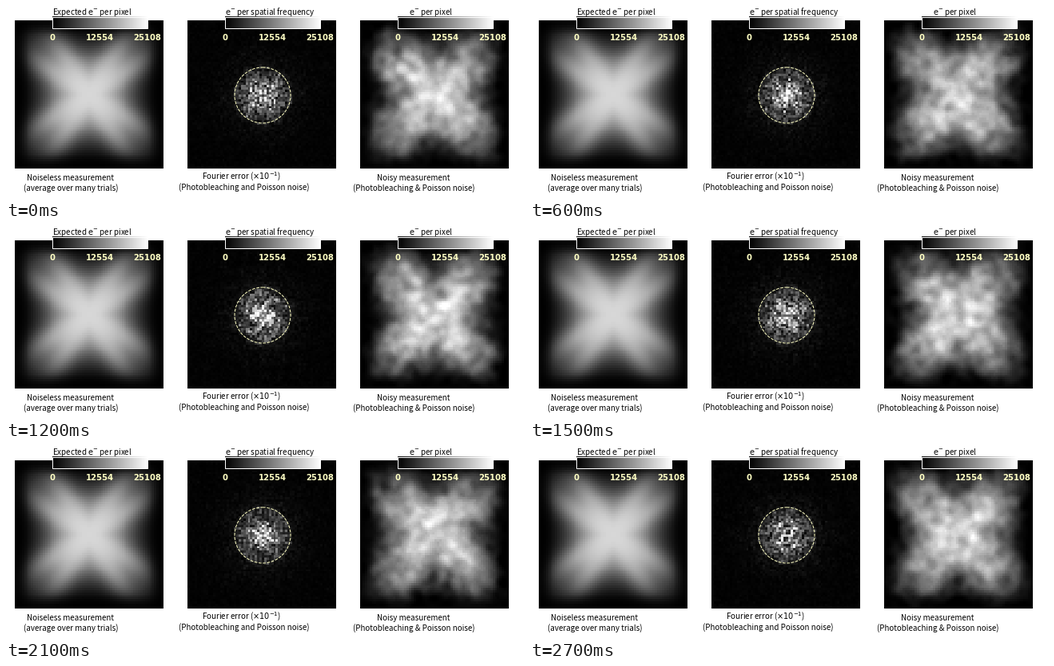
Recreate the animation shown at these times as a matplotlib script. Size 648 by 241 pixels, loop 3 s.

```python
import numpy as np
import matplotlib.pyplot as plt
from matplotlib.animation import FuncAnimation
from matplotlib.patches import Circle, Rectangle

WIDTH, HEIGHT, DPI = 648, 241, 100
GRID, SIDE, TOP = 64, 186, 18
LEFTS = (11, 227, 443)
FRAMES, INTERVAL = 10, 300
PALE = "#ffffc4"
PT = 72 / DPI

plt.rcParams["mathtext.fontset"] = "dejavusans"


def blurred_star():
    """Expected signal: a soft diagonal cross with scalloped edges."""
    axis = (np.arange(GRID) + 0.5) / GRID * 2 - 1
    u, v = np.meshgrid(axis, axis)
    r, theta = np.hypot(u, v), np.arctan2(v, u)
    reach = 0.58 + 0.42 * np.sin(2 * theta) ** 2
    body = 0.84 * np.exp(-(r / reach) ** 2.6)
    lobes = 1 + 0.15 * np.clip((r - 0.45) / 0.5, 0, 1) * np.cos(12 * theta)
    window = 1 / ((1 + np.exp((abs(u) - 0.87) / 0.055))
                  * (1 + np.exp((abs(v) - 0.87) / 0.055)))
    return body * lobes * window


def noise_spectrum():
    """Mean error at each spatial frequency, zero frequency at the centre."""
    k = np.arange(GRID) - GRID // 2
    r = np.hypot(*np.meshgrid(k, k))
    inside = 1 / (1 + np.exp((r - 12) / 0.5))
    return ((0.52 * np.exp(-(r / 6.2) ** 2) + 0.16) * inside
            + 0.09 * np.exp(-(r / 15) ** 2) + 0.013)


expected = blurred_star()
spectrum = noise_spectrum()


def measure(frame):
    rng = np.random.default_rng(40 + frame)
    white = rng.normal(size=(GRID, GRID)) * np.sqrt(expected / expected.mean())
    error = np.fft.fftshift(np.fft.fft2(white, norm="ortho")) * spectrum
    residual = np.fft.ifft2(np.fft.ifftshift(error), norm="ortho").real
    return abs(error), expected + 0.4 * residual


fig = plt.figure(figsize=(WIDTH / DPI, HEIGHT / DPI), dpi=DPI, facecolor="white")
ax = fig.add_axes([0, 0, 1, 1])
ax.axis("off")


def show(data, x, y, w, h):
    return ax.imshow(data, cmap="gray", vmin=0, vmax=1, aspect="auto",
                     interpolation="nearest", extent=(x, x + w, y + h, y))


def label(x, y, text, size=9.8, family="Noto Sans CJK JP", **style):
    ax.text(x, y, text, fontsize=size * PT, family=family, va="baseline", **style)


def color_bar(x):
    show(np.linspace(0, 1, 256)[None, :], x, 13, 120, 15)
    ax.add_patch(Rectangle((x, 14), 119, 14, fill=False, ec="white", lw=PT))
    for offset, text in ((0, "0"), (59, "12554"), (118.5, "25108")):
        label(x + offset, 43, text, 10, "DejaVu Sans", ha="center",
              color=PALE, weight="bold")


panels = [show(expected, x, TOP, SIDE, SIDE) for x in LEFTS]
for left in LEFTS:
    color_bar(left + 47)

ax.add_patch(Circle((LEFTS[1] + 94, TOP + 94), 35, fill=False, ec=PALE,
                    lw=PT, ls=(0, (3.7, 1.6))))

electron = r"$\mathrm{e}^{-}$"
label(58, 11, f"Expected {electron} per pixel")
label(274.5, 11, f"{electron} per spatial frequency")
label(503.5, 11, f"{electron} per pixel")

label(26, 219, "Noiseless measurement")
label(22.5, 232, "(average over many trials)")
label(245, 218, r"Fourier error ($\times 10^{-1}$)")
label(215.5, 231, "(Photobleaching and Poisson noise)")
label(464, 219, "Noisy measurement")
label(434.5, 232, "(Photobleaching & Poisson noise)")

ax.set_xlim(0, WIDTH)
ax.set_ylim(HEIGHT, 0)


def update(frame):
    error, noisy = measure(frame)
    panels[1].set_data(error)
    panels[2].set_data(noisy)
    return panels[1:]


anim = FuncAnimation(fig, update, frames=FRAMES, interval=INTERVAL,
                     repeat=True, repeat_delay=0)
plt.show()
```
